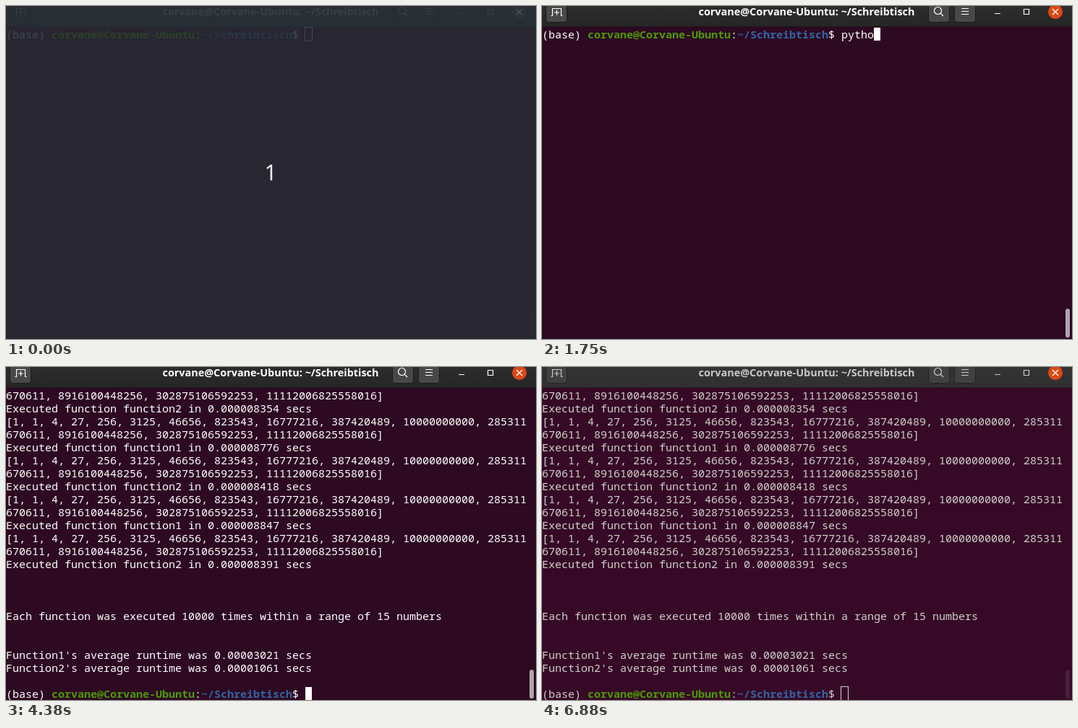
An HTML page for the animation above (7.01 s loop, 733x462 px).

```html
<!DOCTYPE html>
<html lang="de">
<head>
<meta charset="utf-8">
<title>Terminal</title>
<style>
  html, body { margin: 0; width: 100%; height: 100%; overflow: hidden; background: #2d0922; }
  svg { display: block; }
  text { white-space: pre; }
  #rows { font: 15px "Noto Sans Mono", "DejaVu Sans Mono", monospace; }
  .user { fill: #4e9a06; font-weight: 700; }
  .path { fill: #3465a4; font-weight: 700; }
  #title { font: 700 14.4px "Open Sans", "Noto Sans", sans-serif; text-anchor: middle; fill: var(--title); }
  #count { font: 30px "Noto Sans", "Open Sans", sans-serif; text-anchor: middle; fill: #eee; }
  .button { fill: var(--button); stroke: var(--edge); }
  .icon { fill: none; stroke: var(--icon); stroke-width: 1.2; }
</style>
</head>
<body>
<svg width="733" height="462" viewBox="0 0 733 462">
  <defs>
    <linearGradient id="bar" x1="0" y1="0" x2="0" y2="1">
      <stop style="stop-color:var(--barTop)"/>
      <stop offset="1" style="stop-color:var(--barLow)"/>
    </linearGradient>
  </defs>
  <rect id="back" width="733" height="462"/>
  <g id="rows"></g>
  <rect id="cursor" fill="#fff"/>
  <rect id="scroll" x="724" y="420" width="6" height="40" rx="3"/>

  <rect width="733" height="28" fill="url(#bar)"/>
  <path d="M0 28.5H733" style="stroke:var(--edge)"/>
  <rect class="button" x="5.5" y="-10.5" width="29" height="33" rx="4"/>
  <rect class="button" x="534.5" y="-10.5" width="29" height="33" rx="4"/>
  <rect class="button" x="570.5" y="-10.5" width="29" height="33" rx="4"/>
  <text id="title" x="366" y="13"></text>
  <path class="icon" d="M12.5 13.5H14.5V3.5H26.5V13.5H28.5M20.5 5.5V12.5M17 9H24"/>
  <circle class="icon" cx="547.5" cy="6.5" r="5"/>
  <path class="icon" d="M551 10L555 14M580 3.5H590M580 7.5H590M580 11.5H590M626 10.5H634M666.5 4.5H673.5V11.5H666.5Z"/>
  <circle id="close" cx="710" cy="8" r="10"/>
  <path d="M706 4L714 12M714 4L706 12" stroke="#fff" stroke-width="1.4"/>

  <g id="beam" fill="none">
    <path d="M-3 -7H3M0 -7V7M-3 7H3" stroke="#fff" stroke-width="4" stroke-linecap="square"/>
    <path d="M-3 -7H3M0 -7V7M-3 7H3" stroke="#111" stroke-width="1.6"/>
  </g>
  <path id="arrow" d="M0 0V14L3.3 11L5.6 16L8 15L5.8 10.2H10Z" fill="#111" stroke="#fff"/>
  <g id="veil">
    <rect width="733" height="462" fill="#252c32" opacity=".82"/>
    <text id="count" x="366" y="242">1</text>
  </g>
</svg>
<script>
const LOOP = 7010, LINE = 18, CELL = 9, TOP = 30, ROWS = 24, PROMPT_COLS = 46;
const $ = id => document.getElementById(id);
const USER = 'corvane@Corvane-Ubuntu', PATH = '~/Schreibtisch';
const COMMAND = 'python python_timer.py ';

const powers = '[' + Array.from({ length: 15 }, (_, i) => BigInt(i) ** BigInt(i)).join(', ') + ']';
const list = [powers.slice(0, 80), powers.slice(80)];
const executed = (fn, time) => `Executed function function${fn} in 0.00000${time} secs`;

const prompt = typed => `(base) <tspan class="user">${USER}</tspan>:<tspan class="path">${PATH}</tspan>$ ${typed}`;

function random(seed) {
  return () => (seed = seed * 16807 % 2147483647) / 2147483647;
}

// One page of scrolling output; the phase sets which line is on top.
function stream(phase) {
  const next = random(phase * 7919 + 11);
  return Array.from({ length: ROWS - 1 }, (_, row) => {
    const n = row + phase, part = n % 3;
    if (part < 2) return list[part];
    const fn = Math.floor(n / 3) % 2 + 1;
    return executed(fn, (fn === 1 ? 8700 : 8340) + Math.floor(next() * 180));
  });
}

const summary = [
  list[1], executed(2, 8354),
  ...[8776, 8418, 8847, 8391].flatMap((time, i) => [...list, executed(i % 2 + 1, time)]),
  '', '', '',
  'Each function was executed 10000 times within a range of 15 numbers',
  '', '',
  "Function1's average runtime was 0.00003021 secs",
  "Function2's average runtime was 0.00001061 secs",
  '', prompt('')
];

const atPrompt = n => ({ lines: [prompt(COMMAND.slice(0, n))], cursor: [PROMPT_COLS + n, 0] });
const output = phase => ({ lines: stream(phase), cursor: [0, ROWS - 1] });
const END = [PROMPT_COLS, ROWS - 1];

// Each step changes part of the state and holds until the next one.
const steps = [
  [0, { veil: true, active: false, glow: 0, close: false, beam: null, arrow: null, ...atPrompt(0) }],
  [250, { veil: false, beam: [244.5, 95.5] }],
  [380, { beam: [272.5, 122.5] }],
  [500, { beam: [316.5, 164.5] }],
  [630, { beam: [345.5, 190] }],
  [750, { active: true, close: true, glow: .5 }],
  [880, { glow: .9 }],
  [1000, { glow: 1 }],
  [1380, { beam: null, ...atPrompt(1) }],
  [1500, atPrompt(2)],
  [1630, atPrompt(4)],
  [1750, atPrompt(5)],
  [1880, atPrompt(6)],
  [2000, atPrompt(7)],
  [2500, atPrompt(8)],
  [2880, atPrompt(COMMAND.length)],
  [3250, { cursor: null }],
  [3380, { cursor: [0, 1] }],
  [3500, output(1)],
  [3630, output(5)],
  [3750, output(3)],
  [3880, { lines: summary, cursor: null }],
  [4380, { cursor: END }],
  [5250, { cursor: null, beam: [343.5, 190] }],
  [5500, { beam: [346.5, 194] }],
  [5630, { cursor: END }],
  [6250, { cursor: null, beam: null, arrow: [78.5, 2.5] }],
  [6380, { arrow: null }],
  [6750, { active: false, glow: .8, cursor: END }],
  [6880, { glow: .5 }]
];
let held = {};
const states = steps.map(([, change]) => held = { ...held, ...change });

// Grey levels: backdrop window, focused window.
const greys = {
  barTop: [59, 45], barLow: [57, 38], button: [57, 72],
  edge: [40, 27], title: [146, 255], icon: [150, 255]
};

function place(el, at) {
  el.style.display = at ? '' : 'none';
  if (at) el.setAttribute('transform', `translate(${at})`);
}

function setBox(el, x, y, width, height) {
  Object.entries({ x, y, width, height }).forEach(([k, v]) => el.setAttribute(k, v));
}

function drawCursor(at, active) {
  const el = $('cursor');
  el.style.display = at ? '' : 'none';
  if (!at) return;
  const x = at[0] * CELL, y = TOP + at[1] * LINE;
  if (active) setBox(el, x, y, CELL, LINE);
  else setBox(el, x - .5, y - .5, CELL + 1, LINE + 1);
  el.style.fill = active ? '#fff' : 'none';
  el.style.stroke = active ? 'none' : '#d0cfcc';
}

function draw(s) {
  for (const [name, [off, on]] of Object.entries(greys)) {
    const v = Math.round(off + (on - off) * s.glow);
    document.documentElement.style.setProperty('--' + name, `rgb(${v},${v},${v})`);
  }
  $('back').style.fill = s.active ? '#2d0922' : '#360a26';
  $('rows').style.fill = s.active ? '#fff' : '#d0cfcc';
  $('scroll').style.fill = s.active ? '#aea5ab' : '#47203a';
  $('close').style.fill = s.close ? '#dd4814' : '#565656';
  $('veil').style.display = s.veil ? '' : 'none';
  $('rows').innerHTML = s.lines.map((line, i) =>
    `<text x="0" y="${TOP + i * LINE + 15}">${line}</text>`).join('');
  drawCursor(s.cursor, s.active);
  place($('beam'), s.beam);
  place($('arrow'), s.arrow);
}

$('title').textContent = `${USER}: ${PATH}`;
let shown = -1;
function tick() {
  const t = performance.now() % LOOP;
  const now = steps.findLastIndex(([start]) => start <= t);
  if (now !== shown) draw(states[shown = now]);
  requestAnimationFrame(tick);
}
tick();
</script>
</body>
</html>
```
